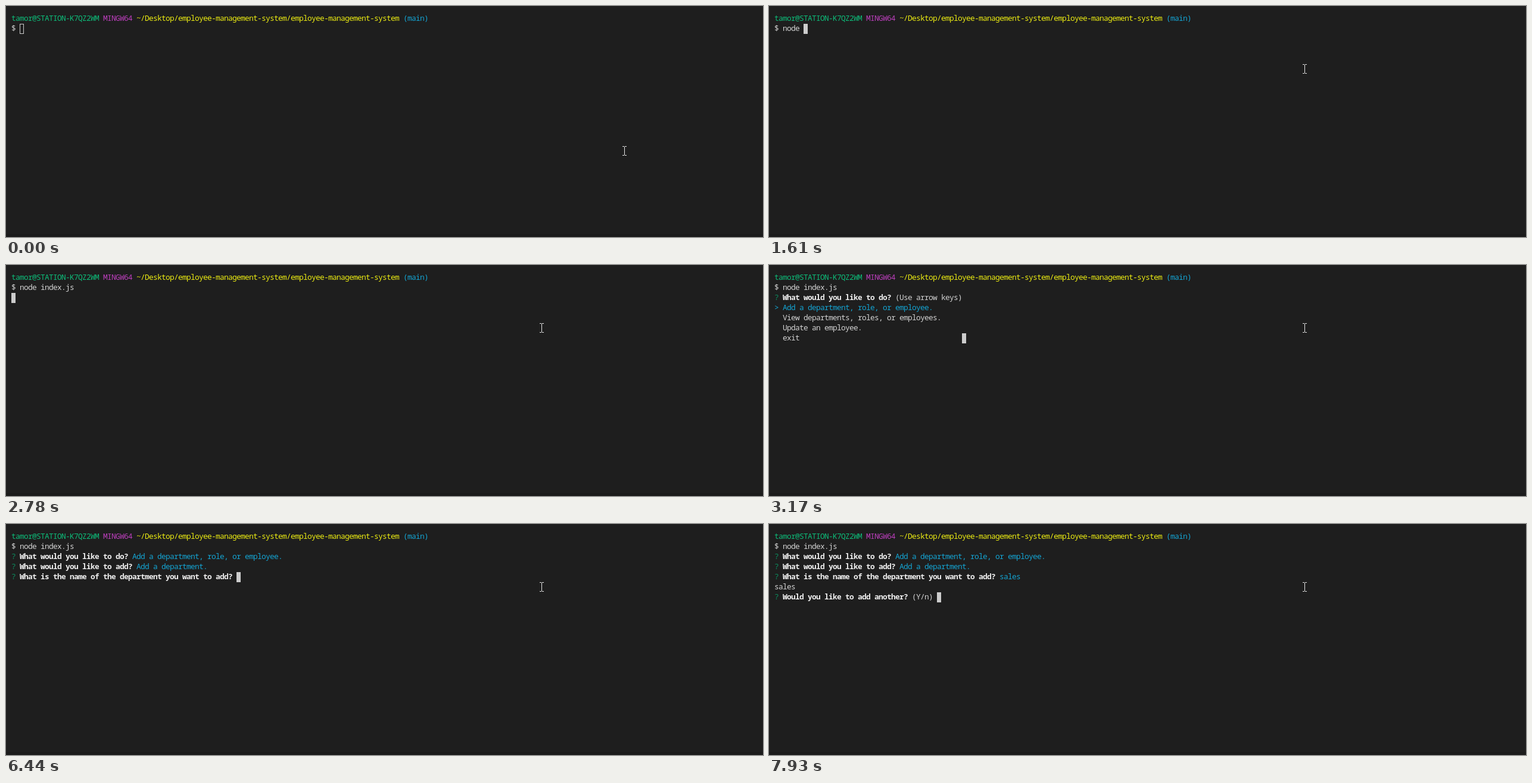
These frames come from a looping animation (1271 px wide and 389 px high, 8000 ms). An HTML page with a canvas:

```html
<!DOCTYPE html>
<html lang="en">
<head>
<meta charset="utf-8">
<title>Terminal session</title>
<style>
  html, body { margin: 0; width: 100%; height: 100%; overflow: hidden; background: #1e1e1e; }
  canvas { display: block; }
</style>
</head>
<body>
<canvas id="stage" width="1271" height="389"></canvas>
<script>
const ctx = document.getElementById('stage').getContext('2d');
const LOOP = 8000;
// Glyphs are slightly wider than the cell, which gives the tight terminal spacing.
const CELL = { w: 7, h: 17, left: 9, top: 13, baseline: 12 };
const FONT = '12.8px "Noto Sans Mono", "DejaVu Sans Mono", monospace';

// A row is a list of spans; a span is [text, color, bold].
const plain = text => [text, '#d4d4d4'];
const cyan = text => [text, '#14a5d4'];
const question = (text, ...rest) => [['? ', '#0b8f5e'], [text + ' ', '#f0f0f0', true], ...rest];
const choices = (first, ...others) => [[cyan('> ' + first)], ...others.map(c => [plain('  ' + c)])];

const path = '~/Desktop/employee-management-system/employee-management-system ';
const header = [['tamor@STATION-K7QZ2WM ', '#0dbc79'], ['MINGW64 ', '#bc3fbc'], [path, '#eeee12'], cyan('(main)')];
const shell = command => [header, [plain('$ ' + command)]];
const started = shell('node index.js');

const doWhat = answer => question('What would you like to do?', answer);
const addWhat = answer => question('What would you like to add?', answer);
const hint = plain('(Use arrow keys)');
const answered = [...started, doWhat(cyan('Add a department, role, or employee.')), addWhat(cyan('Add a department.'))];
const naming = answer => [...answered, question('What is the name of the department you want to add?', answer)];
const saved = [...naming(cyan('sales')), [plain('sales')]];

// Each scene: start time, rows, cursor column, cursor row.
const scenes = [];
const scene = (time, rows, col, row) => scenes.push({ time, rows, col, row });
const typeCommand = (time, text) => scene(time, shell(text), 2 + text.length, 1);
const typeName = (time, text) => scene(time, naming(plain(text)), 54 + text.length, 4);

typeCommand(0, '');
[1070, 1150, 1300, 1460, 1610, 2160, 2310, 2390].forEach((time, i) =>
  typeCommand(time, 'node ind'.slice(0, i + 1)));
typeCommand(2620, 'node index.js ');
scene(2780, started, 0, 2);
scene(3170, [...started, doWhat(hint), ...choices('Add a department, role, or employee.',
  'View departments, roles, or employees.', 'Update an employee.', 'exit')], 45, 6);
scene(5350, [...answered.slice(0, 3), addWhat(hint), ...choices('Add a department.',
  'Add a role.', 'Add an employee.', 'back')], 65, 7);
typeName(6440, '');
scene(7060, answered, 0, 4);
typeName(7140, 's');
typeName(7300, 'sal');
scene(7380, answered, 0, 4);
typeName(7460, 'sales');
scene(7850, saved, 0, 6);
scene(7930, [...saved, question('Would you like to add another?', plain('(Y/n) '))], 39, 6);

const pointer = [
  { time: 0, x: 1038, y: 244 },
  { time: 70, x: 950, y: 157 },
  { time: 150, x: 899, y: 106 }
];
const FOCUS_TIME = 220;

const current = (list, time) => list.filter(item => item.time <= time).pop();
const cellX = col => CELL.left + col * CELL.w;
const cellY = row => CELL.top + row * CELL.h;

function box(color, x, y, w, h) {
  ctx.fillStyle = color;
  ctx.fillRect(x, y, w, h);
}

function drawRow(spans, row) {
  let col = 0;
  for (const [text, color, bold] of spans) {
    ctx.font = (bold ? '700 ' : '500 ') + FONT;
    ctx.fillStyle = color;
    for (const char of text) ctx.fillText(char, cellX(col++), cellY(row) + CELL.baseline);
  }
}

function drawCursor(col, row, focused) {
  const x = cellX(col), y = cellY(row);
  box('#cccccc', x, y, CELL.w, CELL.h);
  if (!focused) box('#1e1e1e', x + 1, y + 1, CELL.w - 2, CELL.h - 2);
}

function drawPointer({ x, y }) {
  box('#e8e8e8', x, y - 7, 1, 14);
  for (const edge of [y - 8, y + 7]) {
    box('#e8e8e8', x - 3, edge, 3, 1);
    box('#e8e8e8', x + 1, edge, 3, 1);
  }
}

function draw(now) {
  const time = now % LOOP;
  const { rows, col, row } = current(scenes, time);
  box('#1e1e1e', 0, 0, 1271, 389);
  box('#1b1b1b', 0, 384, 1271, 5);
  rows.forEach(drawRow);
  drawCursor(col, row, time >= FOCUS_TIME);
  drawPointer(current(pointer, time));
}

const start = performance.now();
function tick() {
  draw(performance.now() - start);
  requestAnimationFrame(tick);
}
tick();
</script>
</body>
</html>
```
